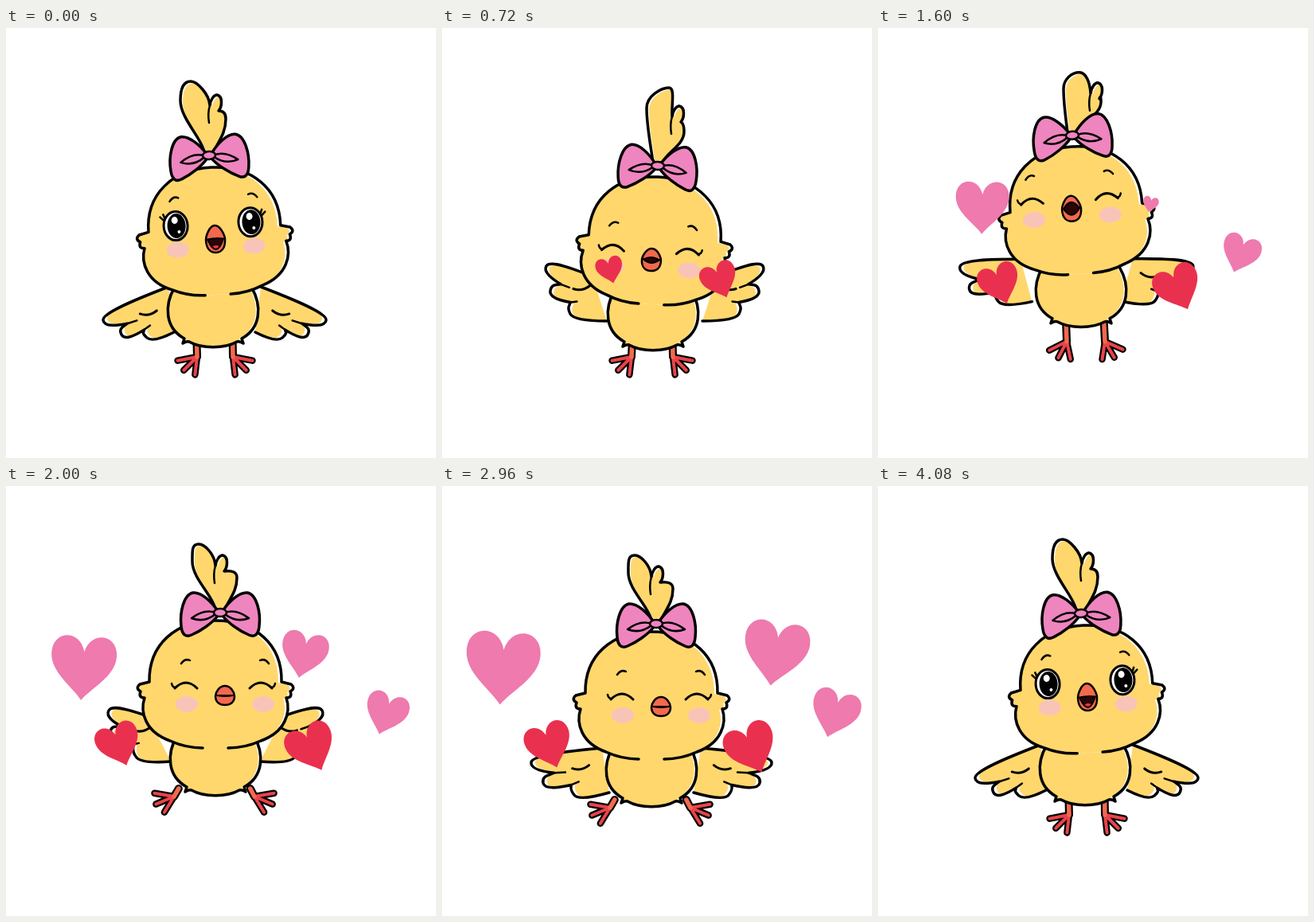
Write an HTML page with a canvas that moves like this. It is 540 px wide and 540 px high and loops after 4.16 s.

```html
<!DOCTYPE html>
<html>
<head>
<meta charset="utf-8">
<style>
html, body { margin: 0; height: 100%; overflow: hidden; background: #fff; }
canvas { display: block; width: 100vw; height: 100vh; object-fit: contain; }
</style>
</head>
<body>
<canvas id="stage" width="540" height="540"></canvas>
<script>
const g = document.getElementById('stage').getContext('2d');
const LOOP = 4160;
const YELLOW = '#ffd76d', PINK = '#ee85bf', ROSE = '#ee7aae', RED = '#ea304f',
      ORANGE = '#f3694d', BLUSH = '#f9c4b8', INK = '#000';

// head: centre and tilt; face: beak offset; knot: bow offset; crest: left edge and three tips;
// body: centre and bottom; feet: ankle and angle; wing: shoulder, three feathers, end;
// beak: height, arch, opening
const stand = {
  head: [262, 255, -3], face: [1, 10], knot: [-7, -95], crest: [-36, -23, -93, 10, -76, 21, -46],
  body: [260, 401], left: [240, 413, 132], right: [285, 413, 48],
  wing: [[58, 70], [140, 112], [117, 130], [85, 134], [51, 127]], tilt: 0, front: 0,
  eye: 1, beak: [17, 1, 13]
};
const giggle = {
  head: [267, 267, 3], face: [-4, 24], knot: [4, -94], crest: [-14, 14, -98, 27, -75, 33, -43],
  body: [265, 405], left: [238, 413, 132], right: [290, 413, 48],
  wing: [[78, 45], [136, 32], [131, 63], [106, 92], [60, 101]], tilt: 0, front: 0,
  eye: 0, beak: [14, 3, 4]
};
const hop = {
  head: [249, 223, -4], face: [-6, -2], knot: [-5, -94], crest: [-11, 9, -79, 32, -66, 36, -42],
  body: [255, 370], left: [237, 388, 115], right: [285, 388, 62],
  wing: [[80, 40], [131, 29], [128, 64], [110, 92], [57, 104]], tilt: -7, front: 0,
  eye: 0, beak: [16, 8, 8]
};
const land = {
  head: [263, 249, 0], face: [12, 14], knot: [6, -90], crest: [-35, -27, -86, 3, -72, 21, -44],
  body: [263, 389], left: [211, 390, 155], right: [312, 390, 25],
  wing: [[85, 40], [134, 33], [132, 60], [99, 92], [56, 97]], tilt: 0, front: 0,
  eye: 0, beak: [12, 0, 1]
};
const smirk = {
  head: [262, 200, -1.5], face: [5, 2], knot: [-3, -94], crest: [-12, 11, -63, 33, -49, 31, -28],
  body: [263, 346], left: [240, 365, 93], right: [284, 366, 85],
  wing: [[80, 50], [133, 42], [129, 70], [105, 97], [56, 108]], tilt: -1, front: 0,
  eye: .6, beak: [12, 6, -2]
};
const bend = {
  head: [268, 325, 1], face: [2, 48], knot: [8, -76], crest: [-11, 21, -83, 42, -66, 37, -34],
  body: [266, 428], left: [204, 430, 188], right: [326, 428, -12],
  wing: [[62, 72], [83, 137], [57, 133], [34, 132], [10, 77]], tilt: 0, front: 1,
  eye: 0, beak: [14, -1, 5]
};
const moved = (p, dy) => ({
  ...p,
  head: [p.head[0], p.head[1] + dy, p.head[2]],
  body: [p.body[0], p.body[1] + dy],
  left: [p.left[0], p.left[1] + dy, p.left[2]],
  right: [p.right[0], p.right[1] + dy, p.right[2]]
});
const spread = [[70, 62], [147, 72], [135, 100], [98, 115], [56, 115]];
const wide = [[62, 66], [151, 84], [136, 110], [97, 125], [53, 122]];

const poses = [
  [0, stand], [160, stand],
  [400, { ...stand, wing: spread, eye: .9 }],
  [720, giggle],
  [920, { ...giggle, wing: spread }],
  [1120, { ...giggle, head: [264, 255, 0], body: [263, 401] }],
  [1280, hop],
  [1640, { ...moved(hop, 6), wing: spread, tilt: 0 }],
  [2000, land],
  [2480, smirk],
  [2580, moved(smirk, -14)],
  [2800, moved(smirk, 12)],
  [2960, { ...moved(land, 14), wing: wide }],
  [3200, bend], [3480, bend],
  [3720, { ...stand, head: [273, 258, 0], wing: wide, eye: .8 }],
  [3960, stand], [LOOP, stand]
];

// Each key: time, x, y, width, angle
const hearts = [
  [RED, [[560, 230, 296, 0, -15], [720, 211, 304, 34, -15], [1280, 162, 319, 49, -20],
    [2000, 142, 325, 55, -20], [2480, 137, 326, 57, -19], [2880, 135, 326, 58, -19]]],
  [RED, [[560, 320, 312, 0, -20], [720, 349, 317, 46, -22], [1280, 372, 325, 56, -24],
    [2000, 384, 329, 61, -24], [2480, 387, 330, 63, -23], [2880, 389, 330, 64, -23]]],
  [ROSE, [[1080, 205, 216, 0, 0], [1280, 183, 222, 47, -3], [1680, 118, 226, 72, 2],
    [2000, 97, 228, 82, 4], [2480, 83, 228, 89, 4], [2880, 76, 228, 93, 4]]],
  [ROSE, [[1400, 326, 226, 0, 15], [2000, 374, 212, 59, 12], [2480, 411, 211, 77, 9],
    [2880, 419, 210, 82, 9]]],
  [ROSE, [[1080, 385, 288, 0, 20], [1280, 423, 282, 43, 20], [1680, 463, 284, 50, 19],
    [2000, 477, 286, 54, 18], [2480, 489, 286, 58, 17], [2880, 493, 286, 61, 17]]]
];
const lastHeart = [[3240, 220, 162, 0, -10], [3320, 220, 156, 20, -10],
  [3440, 220, 142, 11, -10], [3520, 220, 136, 0, -10]];
const heartPath = new Path2D('M0 .5C-.15 .3-.5 .1-.5-.2C-.5-.55-.08-.58 0-.24C.08-.58 .5-.55 .5-.2C.5 .1 .15 .3 0 .5Z');

// Right halves; the left ones are mirrored
const bowPath = new Path2D('M3-2C11-14 24-26 34-25C46-23 51 0 49 17C48 29 42 31 36 28C24 23 10 13 3 4Z');
const foldPath = new Path2D('M6 0Q20-5 36 7Q20 13 6 2');
const headPath = new Path2D('M16 80C34 80 46 76 57 71C88 60 95 35 89 17Q97 17 94 9Q101 5 95 0Q91-1 83-3' +
  'C84-50 50-80 0-80C-50-80-84-50-83-3Q-91-1-95 0Q-101 5-94 9Q-97 17-89 17C-95 35-88 60-57 71C-46 76-34 80-16 80');
const bodyPath = new Path2D('M-48-76C-62-52-60-24-36-11L-38-5Q-33-8-30-7C-14 2 14 2 30-7Q33-8 38-5L36-11C60-24 62-52 48-76');

const mix = (a, b, k) => {
  if (typeof a === 'number') return a + (b - a) * k;
  if (Array.isArray(a)) return a.map((v, i) => mix(v, b[i], k));
  return Object.fromEntries(Object.keys(a).map(n => [n, mix(a[n], b[n], k)]));
};
const smooth = k => k * k * (3 - 2 * k);
const span = (keys, t) => {
  let i = 0;
  while (i < keys.length - 2 && t >= keys[i + 1][0]) i++;
  const [a, b] = [keys[i], keys[i + 1]];
  return [a, b, Math.min(1, Math.max(0, (t - a[0]) / (b[0] - a[0])))];
};

function at(x, y, deg, draw, sx = 1, sy = 1) {
  g.save();
  g.translate(x, y);
  g.rotate(deg * Math.PI / 180);
  g.scale(sx, sy);
  draw();
  g.restore();
}
function line(path, width = 3.5, color = INK) {
  g.lineWidth = width;
  g.strokeStyle = color;
  g.stroke(typeof path === 'string' ? new Path2D(path) : path);
}
function fill(path, color) {
  g.fillStyle = color;
  g.fill(path);
}
function oval(x, y, rx, ry, color) {
  const p = new Path2D();
  p.ellipse(x, y, rx, ry, 0, 0, 7);
  fill(p, color);
  return p;
}
// Colour shifted inside the outline leaves a white rim
function plump(path, color, dx, dy) {
  fill(path, '#fff');
  g.save();
  g.clip(path);
  g.translate(dx, dy);
  fill(path, color);
  g.restore();
  line(path);
}

function wing([s, ...tips]) {
  const end = tips.pop(), root = mix(s, end, .5), p = new Path2D(), veins = new Path2D();
  p.moveTo(...s);
  let from = s, out;
  tips.forEach((tip, i) => {
    const dx = tip[0] - root[0], dy = tip[1] - root[1], d = Math.hypot(dx, dy) || 1;
    const u = [dx / d, dy / d];
    const off = (q, along, across) => [q[0] + u[0] * along - u[1] * across, q[1] + u[1] * along + u[0] * across];
    const last = i === tips.length - 1;
    const notch = last ? end : mix(mix(tip, tips[i + 1], .55), root, .24);
    p.bezierCurveTo(...off(mix(from, tip, .5), 0, i ? -3 : -5), ...off(tip, 0, -9), ...tip);
    p.bezierCurveTo(...off(tip, 0, 9), ...off(mix(tip, notch, .6), 0, 4), ...notch);
    if (!last) {
      veins.moveTo(...notch);
      veins.lineTo(...mix(notch, root, .22));
    }
    if (!i) out = u;
    from = notch;
  });
  plump(p, YELLOW, -out[0] * 5, -out[1] * 5 - 1);
  line(veins, 2.5);
  return root;
}
function wings(p) {
  for (const side of [-1, 1])
    at(p.head[0], p.head[1], p.tilt, () => {
      const root = wing(p.wing);
      if (p.front < .5) {
        const [x, y] = mix(root, p.wing[1], .33);
        at(x, y, 0, () => line('M-10-3Q0 5 11 1', 3));
      }
    }, side);
}

function foot([x, y, deg], hipX, hipY) {
  const leg = new Path2D();
  leg.moveTo(x * .8 + hipX * .2, hipY);
  leg.lineTo(x, y);
  const toes = new Path2D();
  [[-36, 25], [0, 25], [36, 25]].forEach(([spreadBy, len]) => {
    const a = (deg + spreadBy) * Math.PI / 180;
    toes.moveTo(x, y);
    toes.lineTo(x + Math.cos(a) * len, y + Math.sin(a) * len * .9);
  });
  line(leg, 10);
  line(toes, 8.5);
  line(toes, 4, '#e9434a');
  line(leg, 5.5, ORANGE);
}

function eye(side, open) {
  at(side * 47 - 2, -13 - 6 * open, 0, () => {
    if (open < .3) {
      line('M-14 4Q0-10 14 4', 3);
      line(side < 0 ? 'M-13 3Q-17 3-18-2' : 'M13 3Q17 3 18-2', 2.5);
      return;
    }
    const lid = -20 + (1 - open) * 32, ry = 10 + 8 * open;
    g.save();
    g.beginPath();
    g.rect(-22, lid, 44, 50);
    g.clip();
    line(oval(0, 0, 15, ry, '#fff'), 3);
    oval(1, 0, 11.5, ry - 2.5, INK);
    oval(-1, -ry * .4, 4, 4.5, '#fff');
    oval(4, ry * .42, 2, 2, '#fff');
    g.restore();
    if (open < .9) line(`M-16 ${lid}L16 ${lid}`, 3.5);
    const y = Math.max(lid, -10);
    line(`M${side * 14} ${y + 3}l${side * 5} -5M${side * 13} ${y}l${side * 2} -5`, 2.5);
  });
}

function face(p) {
  for (const side of [-1, 1]) {
    oval(side * 48, 11, 14, 10, BLUSH);
    eye(side, p.eye);
    at(side * 50, -43 - 10 * p.eye, 0, () => line('M-5 3Q0-4 6-1', 2.5), side < 0 ? 1 : -1);
  }
  const [h, arch, open] = p.beak;
  const b = new Path2D(`M0 ${-h}C7 ${-h} 12-4 12 1C12 ${h * .7} 7 ${h} 0 ${h}C-7 ${h}-12 ${h * .7}-12 1C-12-4-7 ${-h} 0 ${-h}Z`);
  fill(b, ORANGE);
  const mouth = new Path2D(`M-10 0Q0 ${-2 * arch} 10 0Q0 ${2 * open}-10 0Z`);
  fill(mouth, '#2b0508');
  if (open > 9) {
    g.save();
    g.clip(mouth);
    oval(0, open, 6, 5, '#e8364a');
    g.restore();
  }
  line(mouth, 2);
  line(b, 2.5);
}

function crest([left, tx, ty, ax, ay, bx, by]) {
  const vx = ax - 9, vy = ay + 13;
  const p = new Path2D(`M-6-4C-8-20 ${left} ${ty * .5} ${left} ${ty * .74}C${left} ${ty * .9} ${tx - 9} ${ty} ${tx} ${ty}` +
    `C${tx + 8} ${ty} ${vx - 1} ${vy - 14} ${vx} ${vy}C${vx + 1} ${vy - 7} ${ax - 4} ${ay} ${ax} ${ay}` +
    `C${ax + 8} ${ay + 2} ${ax + 6} ${ay + 15} ${ax + 2} ${ay + 20}Q${bx} ${by - 10} ${bx} ${by}C${bx} ${by * .6} 12-18 5-3`);
  plump(p, YELLOW, 3, 2);
  line(`M${vx} ${vy}Q${vx - 3} ${vy + 10} ${vx - 1} ${vy + 22}`, 2.5);
}

function bow() {
  for (const side of [-1, 1])
    at(0, 0, 0, () => {
      fill(bowPath, PINK);
      line(bowPath);
      line(foldPath, 2.5);
    }, side);
  line(oval(0, 0, 8, 5, PINK), 2.5);
}

function chick(p) {
  const [hx, hy, tilt] = p.head, [bx, by] = p.body;
  if (p.front < .5) wings(p);
  foot(p.left, bx - 23, by - 9);
  foot(p.right, bx + 23, by - 9);
  at(bx, by, 0, () => plump(bodyPath, YELLOW, -3, 0));
  at(hx, hy, tilt, () => plump(headPath, YELLOW, -4, 1));
  if (p.front >= .5) wings(p);
  at(hx + p.face[0], hy + p.face[1], tilt, () => face(p));
  at(hx + p.knot[0], hy + p.knot[1], 0, () => {
    crest(p.crest);
    at(0, 0, tilt, bow);
  });
}

function heart(color, keys, t, scale) {
  const [, x, y, w, deg] = mix(...span(keys, t));
  const size = w * scale;
  if (size > .5) at(x, y, deg, () => fill(heartPath, color), size, size);
}

function render(t) {
  g.clearRect(0, 0, 540, 540);
  g.lineCap = g.lineJoin = 'round';
  const [a, b, k] = span(poses, t);
  chick(mix(a[1], b[1], smooth(k)));
  const fade = Math.min(1, Math.max(0, (3360 - t) / 240));
  for (const [color, keys] of hearts) heart(color, keys, t, fade);
  heart(RED, lastHeart, t, 1);
}

const begin = performance.now();
function tick() {
  const t = (performance.now() - begin) % LOOP;
  const step = t >= 2880 && t < 3400 ? 40 : 80;
  render(Math.floor(t / step) * step);
  requestAnimationFrame(tick);
}
tick();
</script>
</body>
</html>
```
